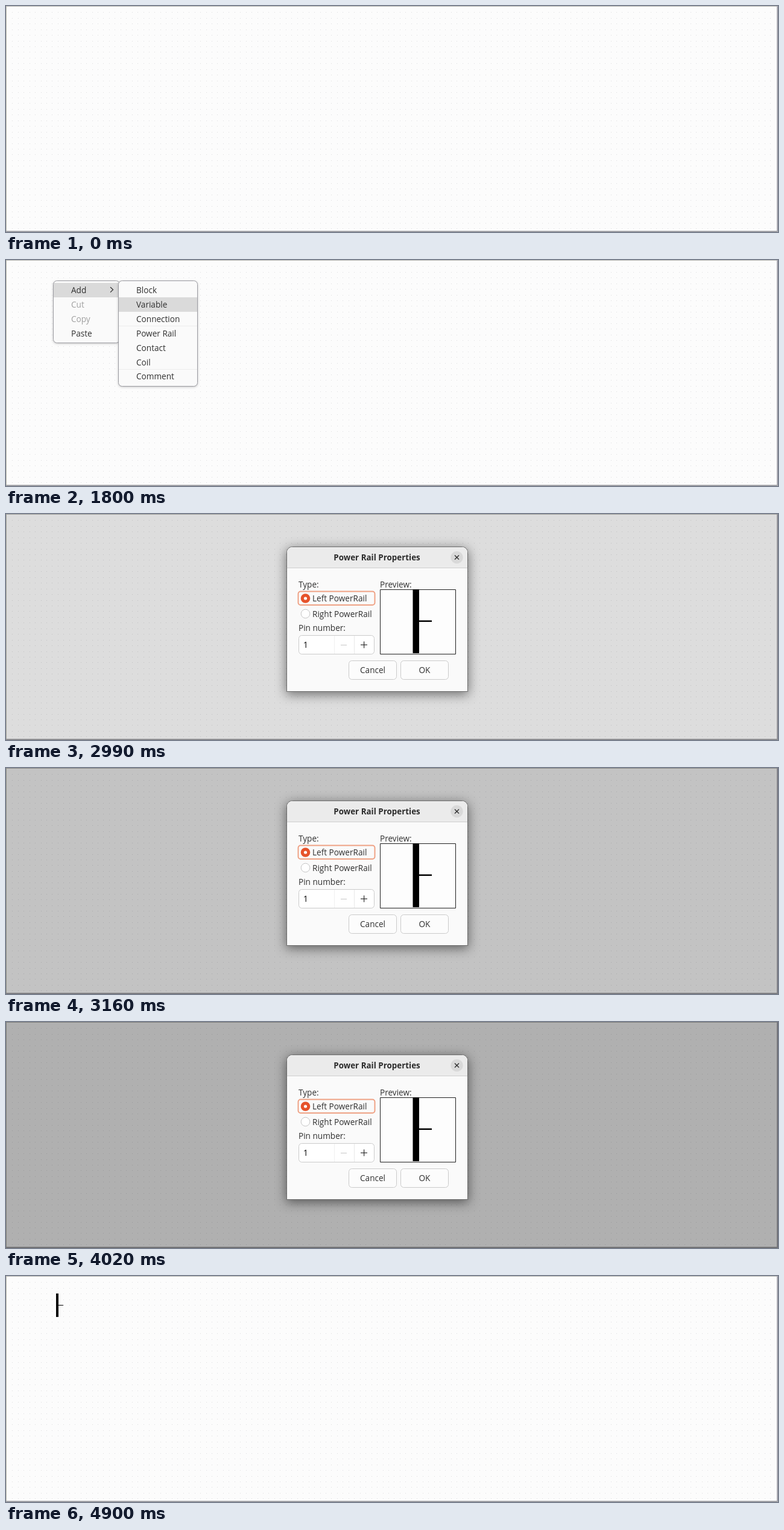
Write an HTML page with a canvas that moves like this. It is 1280 by 375 pixels and loops after 6.59 s.

```html
<!DOCTYPE html>
<html lang="en">
<head>
<meta charset="utf-8">
<title>Adding a power rail</title>
<style>
html, body { margin: 0; width: 100%; height: 100%; overflow: hidden; background: #fcfcfc; }
canvas { display: block; width: 1280px; height: 375px; }
</style>
</head>
<body>
<canvas id="stage" width="1280" height="375"></canvas>
<script>
const W = 1280, H = 375, LOOP = 6590;
const ctx = document.getElementById('stage').getContext('2d');
const FONT = '500 13.6px "Open Sans", "Noto Sans", sans-serif';
const TITLE_FONT = 'bold 13.4px "Open Sans", "Noto Sans", sans-serif';
const INK = '#303030', FAINT = '#a0a0a0';

const progress = (t, start, length) => Math.min(1, Math.max(0, (t - start) / length));
const easeOut = p => p * (2 - p);

function rect(x, y, w, h, color) {
  ctx.fillStyle = color;
  ctx.fillRect(x, y, w, h);
}

function box(x, y, w, h, radius, fill, stroke, lineWidth = 1) {
  ctx.beginPath();
  ctx.roundRect(x, y, w, h, radius);
  if (fill) { ctx.fillStyle = fill; ctx.fill(); }
  if (stroke) { ctx.strokeStyle = stroke; ctx.lineWidth = lineWidth; ctx.stroke(); }
}

function disc(x, y, r, fill, stroke) {
  ctx.beginPath();
  ctx.arc(x, y, r, 0, Math.PI * 2);
  ctx.fillStyle = fill;
  ctx.fill();
  if (stroke) { ctx.strokeStyle = stroke; ctx.lineWidth = 1; ctx.stroke(); }
}

function line(points, color, width = 1) {
  ctx.beginPath();
  points.forEach(([x, y]) => ctx.lineTo(x, y));
  ctx.strokeStyle = color;
  ctx.lineWidth = width;
  ctx.stroke();
}

function text(str, x, y, color = INK, align = 'left', font = FONT) {
  ctx.font = font;
  ctx.textAlign = align;
  ctx.fillStyle = color;
  ctx.fillText(str, x, y);
}

function shadow(blur, dy, alpha) {
  ctx.shadowColor = `rgba(0,0,0,${alpha})`;
  ctx.shadowBlur = blur;
  ctx.shadowOffsetY = dy;
}

function clearShadow() {
  ctx.shadowColor = 'transparent';
}

function drawEditor() {
  rect(0, 0, W, H, '#fcfcfc');
  const pitch = 9.45, offset = 1.3;
  ctx.fillStyle = '#dcdcde';
  for (let y = offset + pitch; y < 372; y += pitch)
    for (let x = offset + pitch; x < 1276; x += pitch)
      ctx.fillRect(Math.floor(x), Math.floor(y), 1, 1);
  rect(0, 0, W, 1, '#b4b4b0');
  rect(0, 0, 1, H, '#b8b8ac');
  rect(1278, 0, 2, H, '#a6a6ae');
  rect(0, 373, W, 2, '#a4a4a8');
}

function drawRail() {
  rect(83, 29, 4, 39, '#000');
  rect(87, 48, 8, 1, '#000');
}

function drawMenu(x, y, w, h, labels, active, disabled = []) {
  shadow(4, 1, 0.25);
  box(x + 0.5, y + 0.5, w - 1, h - 1, 6, '#fafafa');
  clearShadow();
  if (active >= 0) rect(x + 1, y + 4 + active * 23.9, w - 2, 24, '#dadada');
  box(x + 0.5, y + 0.5, w - 1, h - 1, 6, null, '#9c9ca2');
  labels.forEach((label, i) =>
    text(label, x + 30, y + 21 + i * 23.9, disabled.includes(i) ? FAINT : INK));
}

function drawMainMenu(alpha, active) {
  ctx.globalAlpha = alpha;
  drawMenu(78, 34, 111, 104, ['Add', 'Cut', 'Copy', 'Paste'], active, [1, 2]);
  line([[173, 45], [177.5, 49.3], [173, 53.6]], INK, 1.2);
  ctx.globalAlpha = 1;
}

function drawSubmenu(alpha, active) {
  const labels = ['Block', 'Variable', 'Connection', 'Power Rail', 'Contact', 'Coil', 'Comment'];
  ctx.globalAlpha = alpha;
  drawMenu(186, 34, 132, 176, labels, active);
  for (const y of [109, 181]) rect(187, y, 130, 1, '#ececec');
  ctx.globalAlpha = 1;
}

function drawRadio(y, label, checked) {
  if (checked) {
    disc(496.5, y, 7.8, '#e6532b');
    disc(496.5, y, 2.6, '#fff');
  } else {
    disc(496.5, y, 7.3, '#fff', '#c4c4c4');
  }
  text(label, 508, y + 5);
}

function drawButton(x, label) {
  box(x + 0.5, 243.5, 79, 31, 5, '#fcfcfc', '#cbcbcb');
  text(label, x + 40, 263.5, INK, 'center');
}

function drawDialog(scale) {
  const middle = 174.5;
  ctx.save();
  ctx.translate(0, middle);
  ctx.scale(1, scale);
  ctx.translate(0, -middle);

  shadow(18, 4, 0.5);
  box(465.5, 54.5, 300, 240, [9, 9, 0, 0], '#fafafa', '#6c6c6c');
  clearShadow();
  box(466, 55, 299, 239, [9, 9, 0, 0], '#fafafa');
  box(466, 55, 299, 35, [9, 9, 0, 0], '#ebebeb');
  rect(466, 89, 299, 1, '#cfcfcf');
  text('Power Rail Properties', 615, 76.5, '#2c2c2c', 'center', TITLE_FONT);
  disc(747.5, 72, 10.3, '#d9d9d9');
  line([[744, 68.5], [751, 75.5]], INK, 1.4);
  line([[744, 75.5], [751, 68.5]], INK, 1.4);

  text('Type:', 485, 122);
  box(484.5, 128.5, 127, 22.5, 4, '#fafafa', '#efa285', 2);
  drawRadio(140, 'Left PowerRail', true);
  drawRadio(165.5, 'Right PowerRail', false);

  text('Pin number:', 485, 193.5);
  box(485.5, 201.5, 125, 31, 5, '#fff', '#cbcbcb');
  rect(544, 202, 1, 30, '#f0f0f0');
  rect(577, 202, 1, 30, '#e8e8e8');
  text('1', 493, 222, '#000');
  rect(555, 217, 10, 1, '#c6c6c6');
  rect(588, 216.5, 11, 1.2, INK);
  rect(593, 211.5, 1.2, 11, INK);

  text('Preview:', 620, 122);
  box(620.5, 125.5, 125, 107, 0, '#fdfdfd', '#222');
  rect(674.5, 125, 10.5, 106, '#000');
  rect(685, 176.5, 21, 2.5, '#000');

  drawButton(568, 'Cancel');
  drawButton(654, 'OK');
  ctx.restore();
}

function hoveredItem(t) {
  if (t < 1800) return -1;
  if (t < 1870) return 1;
  return t < 1940 ? 2 : 3;
}

function draw(t) {
  drawEditor();
  if (t >= 4100) drawRail();

  if (t >= 830 && t < 2720) drawMainMenu(progress(t, 800, 100), t < 1070 ? -1 : 0);
  if (t >= 1300 && t < 2690) drawSubmenu(t < 1330 ? 0.5 : 1, hoveredItem(t));

  const dim = 0.3 * (progress(t, 2785, 500) - progress(t, 4105, 250));
  if (dim > 0) rect(0, 0, W, H, `rgba(0,0,0,${dim})`);

  const opening = easeOut(progress(t, 2750, 100));
  const closing = easeOut(progress(t, 4090, 100));
  if (opening > closing) drawDialog(opening - closing);
}

const start = performance.now();
function tick() {
  draw((performance.now() - start) % LOOP);
  requestAnimationFrame(tick);
}
tick();
</script>
</body>
</html>
```
